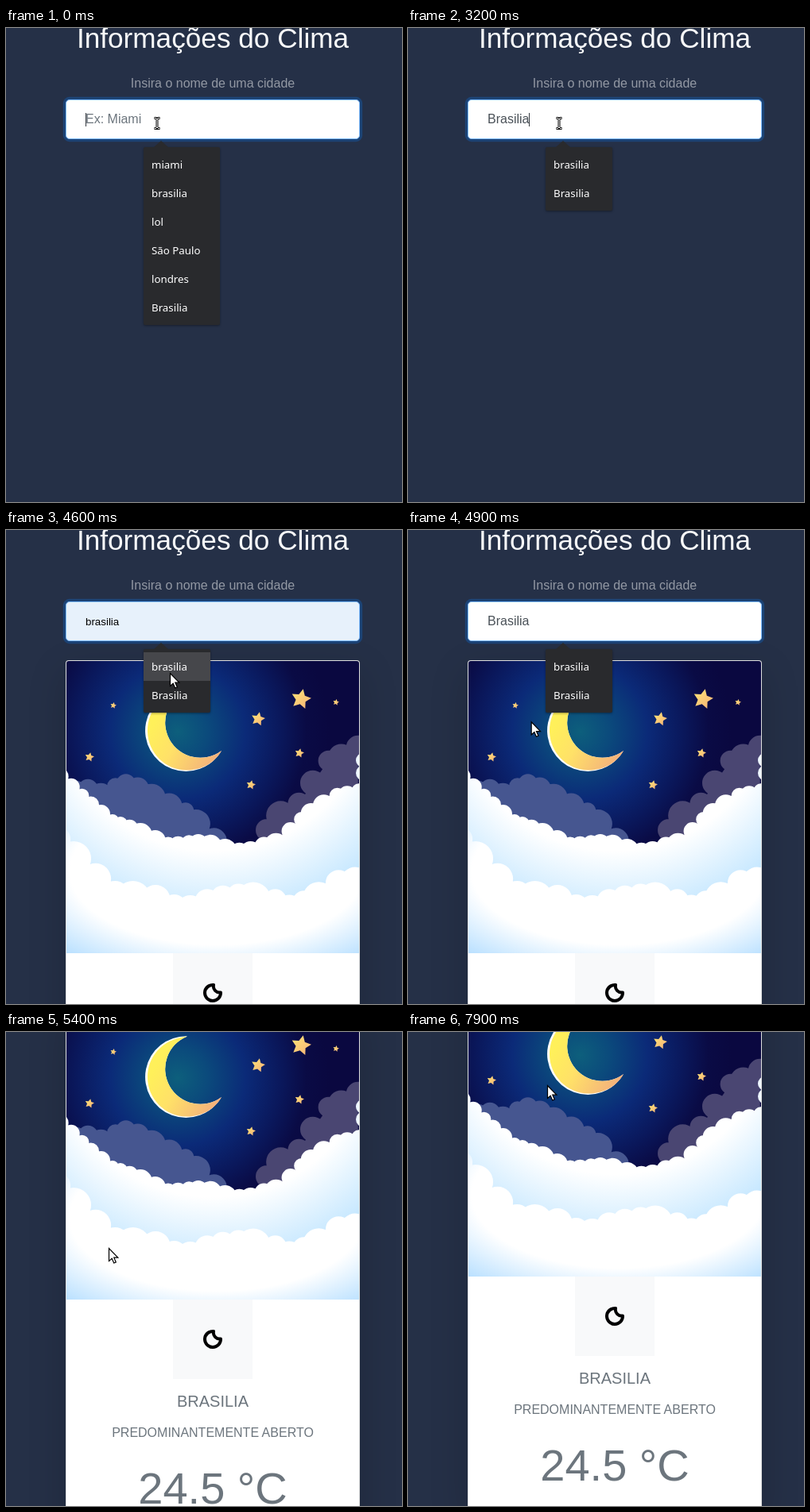
Animation, 498 px wide and 597 px high, one loop 8000 ms. Source, as an HTML page:

```html
<!DOCTYPE html>
<html lang="pt-BR">
<head>
<meta charset="utf-8">
<title>Informações do Clima</title>
<style>
  html, body { margin: 0; width: 100%; height: 100%; overflow: hidden; background: #253047; }
  body { position: relative; font: 16px/25px "Liberation Sans", Arial, sans-serif; }
  svg { display: block; }
  [hidden] { display: none !important; }
  #page, #title, #label, #field, #card, #popup, #cursors { position: absolute; left: 0; top: 0; }
  #title, #label { left: 75px; width: 370px; text-align: center; white-space: nowrap; }
  #title { top: -9px; font-size: 35.2px; line-height: 43px; color: #f8f9fa; }
  #label { top: 57px; color: rgba(255, 255, 255, .5); }

  #field { left: 75px; top: 90px; width: 370px; height: 50px; box-sizing: border-box; padding: 11px 24px;
    background: #fff; color: #495057; border: 1px solid #80bdff; border-radius: 4.8px;
    box-shadow: 0 0 0 3.2px rgba(0, 123, 255, .25); }
  #field.empty { color: #6c757d; }
  #field.preview { background: #e7f1fb; color: #000; font-size: 13.333px; line-height: 27px; }
  #caret { position: absolute; top: 16px; width: 1px; height: 17px; background: #343a40; }
  .empty #caret { left: 24px; }

  #card { left: 75px; top: 164px; width: 368px; background: #fff; border: 1px solid rgba(0, 0, 0, .125);
    border-radius: 4px; box-shadow: 0 16px 48px rgba(0, 0, 0, .175); }
  #art { border-radius: 3px 3px 0 0; }
  #info { display: flow-root; padding-bottom: 24px; text-align: center; color: #6c757d; }
  #icon { margin: 0 auto; background: #f8f9fa; }
  #city { margin-top: 16px; font-size: 20px; line-height: 24px; }
  #sky-text { margin-top: 15px; }
  #temp { margin-top: 24px; font-size: 56px; line-height: 67px; }

  #popup { left: 173px; top: 150px; padding: 4px 0; border-radius: 2px; background: #292a2d; color: #fff;
    font: 13.3px/36px "Noto Sans", "Open Sans", sans-serif; box-shadow: 0 1px 3px rgba(0, 0, 0, .4); }
  #popup::before { content: ""; position: absolute; left: 13px; top: -8px;
    border: solid transparent; border-width: 0 9px 8px; border-bottom-color: #292a2d; }
  #popup div { height: 36px; padding-left: 10px; white-space: nowrap; }
  #popup .hover { background: #46474b; }
</style>
</head>
<body>
<div id="page">
  <div id="title">Informações do Clima</div>
  <div id="label">Insira o nome de uma cidade</div>
  <div id="card">
    <svg id="art" width="368" height="368" viewBox="76 165 368 368">
      <defs>
        <radialGradient id="sky" gradientUnits="userSpaceOnUse" cx="216" cy="254" r="190">
          <stop offset="0" stop-color="#0d5f7c"/>
          <stop offset=".2" stop-color="#0b4a7c"/>
          <stop offset=".45" stop-color="#0b2a78"/>
          <stop offset=".68" stop-color="#0a185c"/>
          <stop offset=".85" stop-color="#0a0b45"/>
          <stop offset="1" stop-color="#0a0840"/>
        </radialGradient>
        <radialGradient id="upper" gradientUnits="userSpaceOnUse" cx="260" cy="200" r="300">
          <stop offset=".68" stop-color="#fff"/>
          <stop offset="1" stop-color="#c0e5ff"/>
        </radialGradient>
        <radialGradient id="lower" gradientUnits="userSpaceOnUse" r="1" gradientTransform="translate(265 430) scale(280 140)" cx="0" cy="0">
          <stop offset=".66" stop-color="#fff"/>
          <stop offset="1" stop-color="#b9e0ff"/>
        </radialGradient>
        <linearGradient id="gold" gradientUnits="userSpaceOnUse" x1="190" y1="235" x2="270" y2="280">
          <stop offset="0" stop-color="#fff05a"/>
          <stop offset=".4" stop-color="#ffe168"/>
          <stop offset="1" stop-color="#f3b07c"/>
        </linearGradient>
        <linearGradient id="starGold" x2="1" y2="1">
          <stop offset="0" stop-color="#ffe676"/>
          <stop offset="1" stop-color="#f5b078"/>
        </linearGradient>
      </defs>
      <rect x="76" y="165" width="368" height="368" fill="url(#sky)"/>
      <g id="stars" fill="url(#starGold)"></g>
      <path fill="#fff" d="M228 201.400A51.300 51.300 0 1 0 271 278A44.300 44.300 0 1 1 228 201.400z"/>
      <path fill="url(#gold)" d="M228 201.400C195 205 178 228 178 253C178 280 200 302.500 227 302.500C246 302.500 263 293 271 278A44.300 44.300 0 1 1 228 201.400z"/>
      <g id="clouds"></g>
    </svg>
    <div id="info">
      <svg id="icon" width="100" height="100">
        <path d="M51 40A10 10 0 1 0 60 49.500A8 8 0 0 1 51 40z" fill="none" stroke="#000" stroke-width="4" stroke-linejoin="round"/>
      </svg>
      <div id="city">BRASILIA</div>
      <div id="sky-text">PREDOMINANTEMENTE ABERTO</div>
      <div id="temp">24.5 °C</div>
    </div>
  </div>
  <div id="field"><span id="value"></span><i id="caret"></i></div>
</div>

<div id="popup"></div>

<svg id="cursors" width="498" height="597">
  <g id="beam" fill="none">
    <path id="bar" d="M186.500 113.500H188.500L190 115L191.500 113.500H193.500M190 115V125M186.500 126.500H188.500L190 125L191.500 126.500H193.500" stroke="#000" stroke-width="3"/>
    <path d="M187 113.500H188.500L190 115L191.500 113.500H193M190 115V125M187 126.500H188.500L190 125L191.500 126.500H193" stroke="#fff"/>
  </g>
  <path id="arrow" d="M.500 .500V16.500L4.200 13.200L6.700 19L9.300 17.900L6.800 12.200H11.800z" fill="#fff" stroke="#000" stroke-width="1.200"/>
</svg>

<script>
const LOOP = 8000, STEP = 100;
const $ = id => document.getElementById(id);
const show = (id, on) => $(id).toggleAttribute('hidden', !on);
const add = (parent, tag, attrs) => {
  const el = document.createElementNS('http://www.w3.org/2000/svg', tag);
  for (const k in attrs) el.setAttribute(k, attrs[k]);
  $(parent).appendChild(el);
};
const parse = text => text.split(',').map(part => part.trim().split(' ').map(Number));

// Linear value at x between keys sorted by their first column
function at(keys, x, col = 1) {
  const i = keys.findIndex(k => k[0] > x);
  if (i === 0) return keys[0][col];
  if (i < 0) return keys[keys.length - 1][col];
  const a = keys[i - 1], b = keys[i];
  return a[col] + (b[col] - a[col]) * (x - a[0]) / (b[0] - a[0]);
}

function star([x, y, r]) {
  const points = Array.from({ length: 10 }, (_, i) => {
    const a = (i * 36 - 78) * Math.PI / 180, d = i % 2 ? r / 2 : r;
    return `${x + d * Math.cos(a)},${y + d * Math.sin(a)}`;
  });
  add('stars', 'polygon', { points: points.join(' ') });
}
parse('371 213 13, 317 238 9, 369 281 6, 308 321 6, 105 286 6, 135 221 4, 415 217 4').forEach(star);

let seed = 3;
const random = () => {
  const n = Math.sin(seed++ * 12.9898) * 43758.5453;
  return n - Math.floor(n);
};

// Puffs of random size whose tops follow an outline of a few points
function cloud(fill, outline, small, big) {
  const keys = parse(outline), end = keys[keys.length - 1][0];
  let base = `M${keys[0][0]} 560`, puffs = '';
  for (let x = keys[0][0]; x <= end;) {
    const r = small + (big - small) * random(), y = at(keys, x) + r;
    base += `L${x} ${y}`;
    puffs += `M${x - r} ${y}a${r} ${r} 0 1 1 ${2 * r} 0a${r} ${r} 0 1 1 ${-2 * r} 0z`;
    x += r * 1.25;
  }
  add('clouds', 'path', { d: `${base}V560z${puffs}`, fill });
}
cloud('#465690', '70 322, 97 312, 120 319, 154 306, 190 323, 236 349, 262 376', 9, 18);
cloud('#4a4672', '328 364, 342 343, 374 328, 388 298, 405 278, 460 250', 10, 19);
add('clouds', 'circle', { cx: 449, cy: 290, r: 9, fill: '#eef7ff' });
add('clouds', 'circle', { cx: 450, cy: 306, r: 10, fill: '#eef7ff' });
cloud('url(#upper)', '66 298, 100 330, 134 358, 172 370, 205 387, 250 382, 298 395, 345 380, 390 338, 416 325, 470 314', 8, 15);
cloud('url(#lower)', '66 374, 104 410, 132 442, 178 442, 221 464, 262 449, 316 443, 362 462, 427 423, 480 430', 14, 24);

const ALL = ['miami', 'brasilia', 'lol', 'São Paulo', 'londres', 'Brasilia'];
const MATCHES = ['brasilia', 'Brasilia'];
const CITY = 'Brasilia';
const keyTimes = [1400, 1800, 2400, 2600, 2800, 3000, 3000, 3200];
const mouse = parse('4200 194 144, 4600 206 180, 4700 206 180, 5000 129 272, 6500 129 272, ' +
  '6600 162 317, 6900 270 414, 7400 252 149, 7900 175 67');
const rows = ALL.map(() => $('popup').appendChild(document.createElement('div')));

// Ease-out from 0 to 1
const ease = (t, from, to) => {
  const p = Math.min(1, Math.max(0, (t - from) / (to - from)));
  return 1 - (1 - p) ** 2;
};

function drawInput(t, preview) {
  const count = keyTimes.filter(k => k <= t).length;
  $('value').textContent = preview ? MATCHES[0] : CITY.slice(0, count) || 'Ex: Miami';
  $('field').className = preview ? 'preview' : count ? '' : 'empty';
  show('caret', t < 600 || t >= 1200 && t < 3800);
}

function drawPopup(t, preview) {
  const typed = t >= keyTimes[0], names = typed ? MATCHES : ALL;
  rows.forEach((row, i) => {
    row.textContent = names[i] || '';
    row.hidden = i >= names.length;
  });
  rows[0].className = preview ? 'hover' : '';
  $('popup').style.width = typed ? '84px' : '96px';
  show('popup', t < 5000);
}

function draw(now) {
  const t = Math.floor(now % LOOP / STEP) * STEP;
  const preview = t >= 4400 && t < 4800;
  drawInput(t, preview);
  drawPopup(t, preview);
  show('card', t >= 3900);
  show('art', t >= 4100);
  const scroll = 108 * ease(t, 4900, 5200) + 117 * ease(t, 5200, 5600);
  $('page').style.top = `${-Math.round(scroll)}px`;
  show('beam', t < 4200);
  show('arrow', t >= 4200);
  $('arrow').setAttribute('transform', `translate(${at(mouse, t)} ${at(mouse, t, 2)})`);
}

const start = performance.now();
function tick() {
  draw(performance.now() - start);
  requestAnimationFrame(tick);
}
tick();
</script>
</body>
</html>
```
